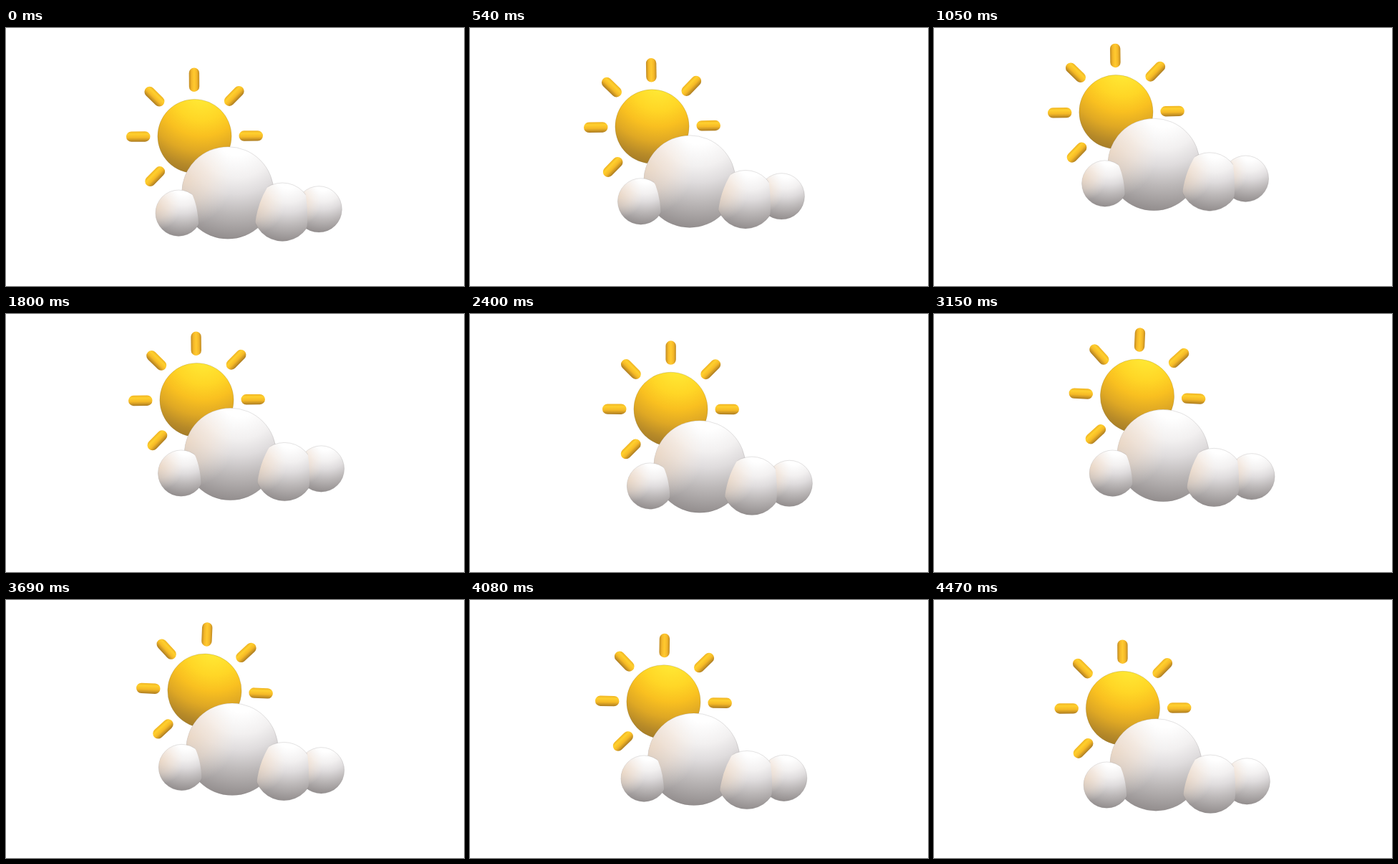
Write an HTML page that moves like this. It is 640 by 360 pixels and loops after 4500 ms.

```html
<!DOCTYPE html>
<html lang="en">
<head>
<meta charset="utf-8">
<title>Sun and cloud</title>
<style>
html, body { margin: 0; width: 100%; height: 100%; overflow: hidden; background: #fff; }
svg { display: block; width: 100%; height: 100%; }
.puff { stroke: #6f6868; stroke-opacity: .28; stroke-width: .7; }
.disc { stroke: #7d6a30; stroke-opacity: .4; stroke-width: .6; }
</style>
</head>
<body>
<svg viewBox="0 0 640 360">
  <defs>
    <radialGradient id="sunFill" cx=".6" cy="-.1" r="1.15">
      <stop offset=".09" stop-color="#ffe834"/>
      <stop offset=".34" stop-color="#ffd626"/>
      <stop offset=".52" stop-color="#f9c020"/>
      <stop offset=".7" stop-color="#dfa824"/>
      <stop offset=".87" stop-color="#b78a28"/>
      <stop offset=".97" stop-color="#a57c28"/>
    </radialGradient>
    <radialGradient id="puffFill" cx=".6" cy="-.1" r="1.15">
      <stop offset=".17" stop-color="#fff"/>
      <stop offset=".38" stop-color="#f2f0f0"/>
      <stop offset=".53" stop-color="#dfdcdd"/>
      <stop offset=".72" stop-color="#bcb8b8"/>
      <stop offset=".97" stop-color="#918c8c"/>
    </radialGradient>
    <radialGradient id="warm" cx=".04" cy=".36" r=".5">
      <stop offset="0" stop-color="#ffe3c6" stop-opacity=".6"/>
      <stop offset=".5" stop-color="#ffe9d4" stop-opacity=".4"/>
      <stop offset="1" stop-color="#fff2e6" stop-opacity="0"/>
    </radialGradient>
    <linearGradient id="raySide" x2="0" y2="1">
      <stop offset="0" stop-color="#efb424"/>
      <stop offset=".25" stop-color="#ffd02e"/>
      <stop offset=".6" stop-color="#f5b926"/>
      <stop offset="1" stop-color="#ac7c22"/>
    </linearGradient>
    <linearGradient id="rayTop" x2="0" y2="1">
      <stop offset="0" stop-color="#c08b24"/>
      <stop offset=".25" stop-color="#f5b828"/>
      <stop offset=".5" stop-color="#ffca30"/>
      <stop offset=".75" stop-color="#f5b828"/>
      <stop offset="1" stop-color="#c08b24"/>
    </linearGradient>
    <clipPath id="leftCut"><path d="M-45-45H14L16-32Q27-13 28 18V45H-45Z"/></clipPath>
    <clipPath id="midCut"><path d="M-14-45Q-34-18-38 16V45H30L34 24Q37 0 31-35V-45Z"/></clipPath>
  </defs>
  <g id="sun"></g>
  <g id="cloud"></g>
</svg>
<script>
const LOOP = 4500, STEP = 30, RAD = Math.PI / 180;

// key points [time, value]; turning points ease in and out
const sunX = track([0, 263.5], [760, 253], [1800, 266.5], [2400, 280.5], [2980, 284.5]);
const sunY = track([0, 151], [1360, 112], [2400, 132.8], [3180, 114.5]);
const cloudX = track([0, 310], [780, 306.5], [1800, 313.5], [2600, 322]);
const cloudY = track([0, 230], [1360, 184.5], [2400, 213], [3180, 197.5]);
const tilt = track([0, -.4], [1500, -.7], [2400, .1], [3400, 2.9]);

// radius, offset from the big puff, sideways shift under yaw
const PUFFS = [
  { r: 32.2, x: 127, y: 24, yaw: -2 },
  { r: 64.3, x: 0, y: 0, yaw: 0 },
  { r: 32.2, x: -69, y: 28, yaw: -.5, cut: 'leftCut' },
  { r: 40.7, x: 76, y: 27.5, yaw: -3.5, cut: 'midCut' }
];

// smooth periodic curve through a few key points
function track(...keys) {
  const n = keys.length;
  const key = i => {
    const turn = Math.floor(i / n), [t, v] = keys[i - turn * n];
    return [t + turn * LOOP, v];
  };
  const slope = i => {
    const [a, b, c] = [key(i - 1), key(i), key(i + 1)];
    const h0 = b[0] - a[0], h1 = c[0] - b[0];
    const d0 = (b[1] - a[1]) / h0, d1 = (c[1] - b[1]) / h1;
    return d0 * d1 <= 0 ? 0 : (d0 * h1 + d1 * h0) / (h0 + h1);
  };
  return t => {
    let i = n - 1;
    while (keys[i][0] > t) i--;
    const [t0, a] = key(i), [t1, b] = key(i + 1);
    const h = t1 - t0, u = (t - t0) / h, v = 1 - u;
    return a + (b - a) * u * u * (3 - 2 * u) + h * u * v * (v * slope(i) - u * slope(i + 1));
  };
}

function add(parent, tag, attrs) {
  const el = document.createElementNS('http://www.w3.org/2000/svg', tag);
  for (const name in attrs) el.setAttribute(name, attrs[name]);
  return parent.appendChild(el);
}

const sun = document.getElementById('sun');
const cloud = document.getElementById('cloud');

add(sun, 'circle', { r: 51.6, fill: 'url(#sunFill)', class: 'disc' });
// six of eight rays; the cloud hides the other two
for (let angle = 135; angle <= 360; angle += 45) {
  const flip = Math.cos(angle * RAD) < -.1 ? -1 : 1;
  add(sun, 'rect', {
    x: 62, y: -7.2, width: 33.5, height: 14.4, rx: 7.2,
    fill: angle === 270 ? 'url(#rayTop)' : 'url(#raySide)',
    transform: `rotate(${angle}) scale(1 ${flip})`
  });
}

for (const puff of PUFFS) {
  puff.el = add(cloud, 'g', puff.cut ? { 'clip-path': `url(#${puff.cut})` } : {});
  add(puff.el, 'circle', { r: puff.r, fill: 'url(#puffFill)', class: 'puff' });
  add(puff.el, 'circle', { r: puff.r, fill: 'url(#warm)' });
}

function draw(t) {
  const sx = sunX(t), cx = cloudX(t), cy = cloudY(t), roll = tilt(t);
  sun.setAttribute('transform', `translate(${sx} ${sunY(t)}) rotate(${roll})`);

  const yaw = (sx - 263.5) / 20;
  const lift = (cy - 230) / 20 + .55 * roll;
  const sin = Math.sin(roll * RAD), cos = Math.cos(roll * RAD);
  for (const p of PUFFS) {
    const x = p.x + p.yaw * yaw;
    const y = p.y && p.y + lift;
    p.el.setAttribute('transform',
      `translate(${cx + x * cos - y * sin} ${cy + x * sin + y * cos})`);
  }
}

const start = performance.now();
function tick() {
  const t = (performance.now() - start) % LOOP;
  draw(Math.floor(t / STEP) * STEP);
  requestAnimationFrame(tick);
}
tick();
</script>
</body>
</html>
```
